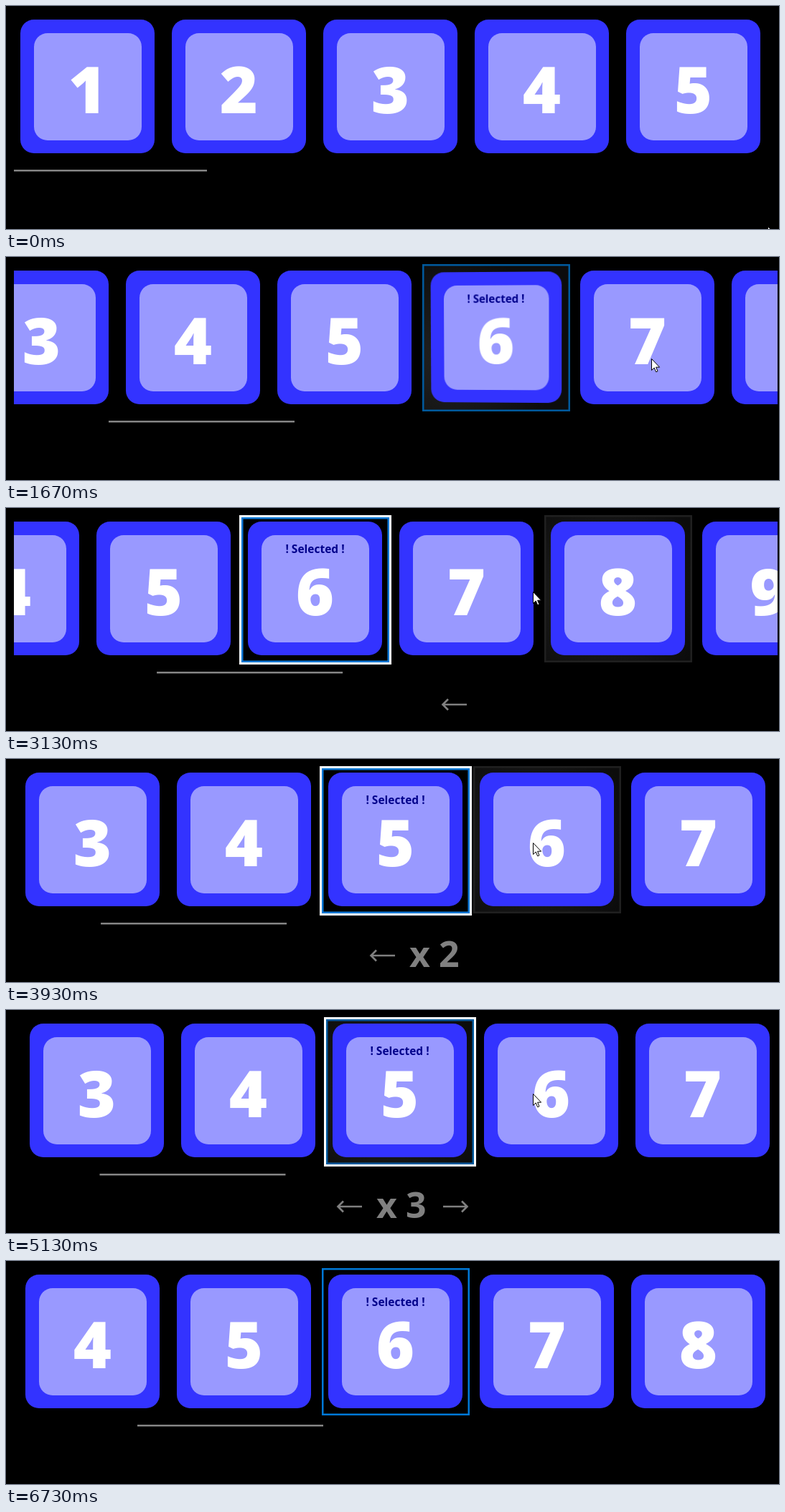
Recreate the animation shown at these times as an HTML page. Size 1077 px wide and 312 px high, loop 6.79 s.

```html
<!DOCTYPE html>
<html lang="en">
<head>
<meta charset="utf-8">
<title>Centered selection list</title>
<style>
  html, body { margin: 0; width: 100%; height: 100%; overflow: hidden; background: #000; }
  #list { position: absolute; left: 11px; top: 10px; width: 1064px; height: 209px; overflow: hidden; }
  .cell { position: absolute; left: 0; top: 0; width: 206px; height: 206px; }
  .frame, .focus { position: absolute; box-sizing: border-box; }
  .frame { inset: 0; box-shadow: inset 0 0 0 2.5px var(--line, transparent); background: var(--fill, transparent); }
  .focus { left: -3px; top: 0; width: 212px; height: 209px; border: 3px solid #fff; visibility: hidden; }
  .focused .focus { visibility: visible; }
  .focused .frame { top: 3px; }
  .hover { --fill: radial-gradient(circle at var(--x) var(--y), #222, #0c0c0c 150px); --line: #202020; }
  .selected { --line: #0078d7; }
  .selected.hover { --line: #005a9e; }
  .face { position: absolute; left: 9px; top: 9px; width: 187px; height: 187px; }
  .face text { text-anchor: middle; font-family: "Open Sans", "Noto Sans", sans-serif; }
  .number { font-size: 91px; font-weight: 800; fill: #fff; }
  .label { font-size: 15.5px; font-weight: 700; fill: #00008b; visibility: hidden; }
  .selected .label { visibility: visible; }
  #overlay { position: absolute; left: 0; top: 0; }
  .keys { fill: #808080; font: 700 50px "Open Sans", "Noto Sans", sans-serif; }
  .keys path { fill: none; stroke: #808080; stroke-width: 2.6; }
</style>
</head>
<body>
<div id="list"></div>
<svg id="overlay" width="1077" height="312">
  <rect id="thumb" y="229" height="2.5" fill="#858585"/>
  <g id="keys" class="keys">
    <g id="left"><path d="M35 275H1.5M9 267.5L1.5 275L9 282.5"/><g><text x="55" y="291">x</text><text class="count" x="96" y="291"></text></g></g>
    <g id="right"><path d="M0 275H33.5M26 267.5L33.5 275L26 282.5"/><g><text x="55" y="291">x</text><text class="count" x="96" y="291"></text></g></g>
  </g>
  <path id="cursor" d="M.5 .5V16.5L4.2 13L6.7 18.8L9 17.8L6.6 12.2H11.6Z" fill="#fff" stroke="#000"/>
</svg>
<script>
const LOOP = 6790, SLIDE = 400, PITCH = 211, CELL = 206;
const $ = id => document.getElementById(id);

// Each move selects an item and centers it; "by" tells what caused it.
const moves = [
  { at: 670, item: 4, by: 'click', thumb: 62.5 },
  { at: 1548, item: 6, by: 'click' },
  { at: 2270, item: 7, by: 'click' },
  { at: 3055, item: 6, by: 'left' },
  { at: 3575, item: 5, by: 'left' },
  { at: 4070, item: 4, by: 'left' },
  { at: 4855, item: 5, by: 'right' },
  { at: 5322, item: 6, by: 'right' }
];
let before = { scroll: 0, thumb: 11 };
for (const move of moves) {
  move.scroll = 626 + PITCH * (move.item - 6);
  move.thumb ??= 183 + 51 * (move.item - 6);
  move.from = before;
  before = move;
}

// The pointer enters and leaves while moving, so both ends lie off stage.
const pointerPath = [
  [-330, 1364, 473], [330, 760, 145], [1230, 760, 145], [1430, 899, 142],
  [1950, 899, 142], [2150, 734, 117], [5810, 734, 117], [6340, 140, 316]
];

const cells = Array.from({ length: 20 }, (_, i) => {
  const cell = document.createElement('div');
  cell.innerHTML = `<div class="frame"></div>
    <svg class="face"><rect width="187" height="187" rx="19" fill="#33f"/>
    <rect x="19" y="19" width="150" height="150" rx="19" fill="#99f"/>
    <text class="label" x="93.5" y="44">! Selected !</text>
    <text class="number" x="93.5" y="131">${i + 1}</text></svg>
    <div class="focus"></div>`;
  $('list').append(cell);
  return cell;
});

const ramp = (t, a, b) => Math.min(1, Math.max(0, (t - a) / (b - a)));
const smooth = p => p * p * (3 - 2 * p);
const mix = (a, b, p) => a + (b - a) * p;
const lastMove = t => moves.findLast(m => m.at <= t);

function pointerAt(t) {
  let [, x, y] = pointerPath[0];
  for (let i = 1; i < pointerPath.length; i++) {
    const p = smooth(ramp(t, pointerPath[i - 1][0], pointerPath[i][0]));
    x = mix(x, pointerPath[i][1], p);
    y = mix(y, pointerPath[i][2], p);
  }
  return { x, y };
}

function positionAt(t, key) {
  const move = lastMove(t);
  if (!move) return key === 'scroll' ? 0 : 11;
  return mix(move.from[key], move[key], 1 - (1 - ramp(t, move.at, move.at + SLIDE)) ** 3);
}

// The hovered item stays the same until the list has settled.
function hoverAt(t) {
  const move = lastMove(t);
  const locked = move && t < move.at + (move.by === 'click' ? 600 : 335);
  const { x, y } = pointerAt(locked ? move.at : t);
  const scroll = locked ? move.from.scroll : positionAt(t, 'scroll');
  const offset = x - 11 + scroll;
  const inside = y >= 10 && y < 216 && offset % PITCH < CELL;
  return { item: inside ? Math.floor(offset / PITCH) + 1 : 0, x: offset % PITCH, y: y - 10 };
}

function tiltOf(item, t) {
  const move = moves.find(m => m.by === 'click' && m.item === item);
  if (!move) return '';
  const amount = smooth(ramp(t, move.at - 130, move.at)) - smooth(ramp(t, move.at + 250, move.at + 460));
  if (amount <= 0) return '';
  const { x, y } = pointerAt(move.at);
  const centerX = 113.5 + PITCH * (item - 1) - move.from.scroll;
  const turnY = (x - centerX) / 93 * 6 * amount;
  const turnX = (112.5 - y) / 93 * 6 * amount;
  return `perspective(1000px) rotateY(${turnY}deg) rotateX(${turnX}deg) scale(${1 - 0.023 * amount})`;
}

function drawKeys(t) {
  const count = by => moves.filter(m => m.by === by && m.at <= t).length;
  const lefts = count('left'), rights = count('right');
  const show = (id, n, x) => {
    const group = $(id), times = group.querySelector('g');
    group.setAttribute('visibility', n ? 'visible' : 'hidden');
    group.setAttribute('transform', `translate(${x} 0)`);
    times.style.display = n > 1 ? '' : 'none';
    times.querySelector('.count').textContent = n;
  };
  const rightX = rights > 1 ? 509 : 609;
  show('left', lefts, rights ? rightX - 148 : lefts > 1 ? 507 : 607);
  show('right', rights, rightX);
  $('keys').setAttribute('opacity', 1 - ramp(t, 6430, 6530));
}

function draw(t) {
  const scroll = Math.round(positionAt(t, 'scroll'));
  const selected = lastMove(t)?.item, hover = hoverAt(t);
  const keyboard = t >= 3055 && t < 6725;
  $('list').style.setProperty('--x', hover.x + 'px');
  $('list').style.setProperty('--y', hover.y + 'px');
  cells.forEach((cell, i) => {
    const item = i + 1, active = item === selected;
    cell.className = 'cell' + (active ? ' selected' : '') +
      (item === hover.item ? ' hover' : '') + (active && keyboard ? ' focused' : '');
    cell.style.left = PITCH * i - scroll + 'px';
    cell.style.zIndex = active ? 1 : 0;
    cell.querySelector('.face').style.transform = tiltOf(item, t);
  });
  $('thumb').setAttribute('x', positionAt(t, 'thumb'));
  $('thumb').setAttribute('width', t < moves[1].at ? 269 : 259);
  drawKeys(t);
  const { x, y } = pointerAt(t);
  $('cursor').setAttribute('transform', `translate(${Math.round(x)} ${Math.round(y)})`);
}

const began = performance.now();
function tick() {
  draw((performance.now() - began) % LOOP);
  requestAnimationFrame(tick);
}
tick();
</script>
</body>
</html>
```
